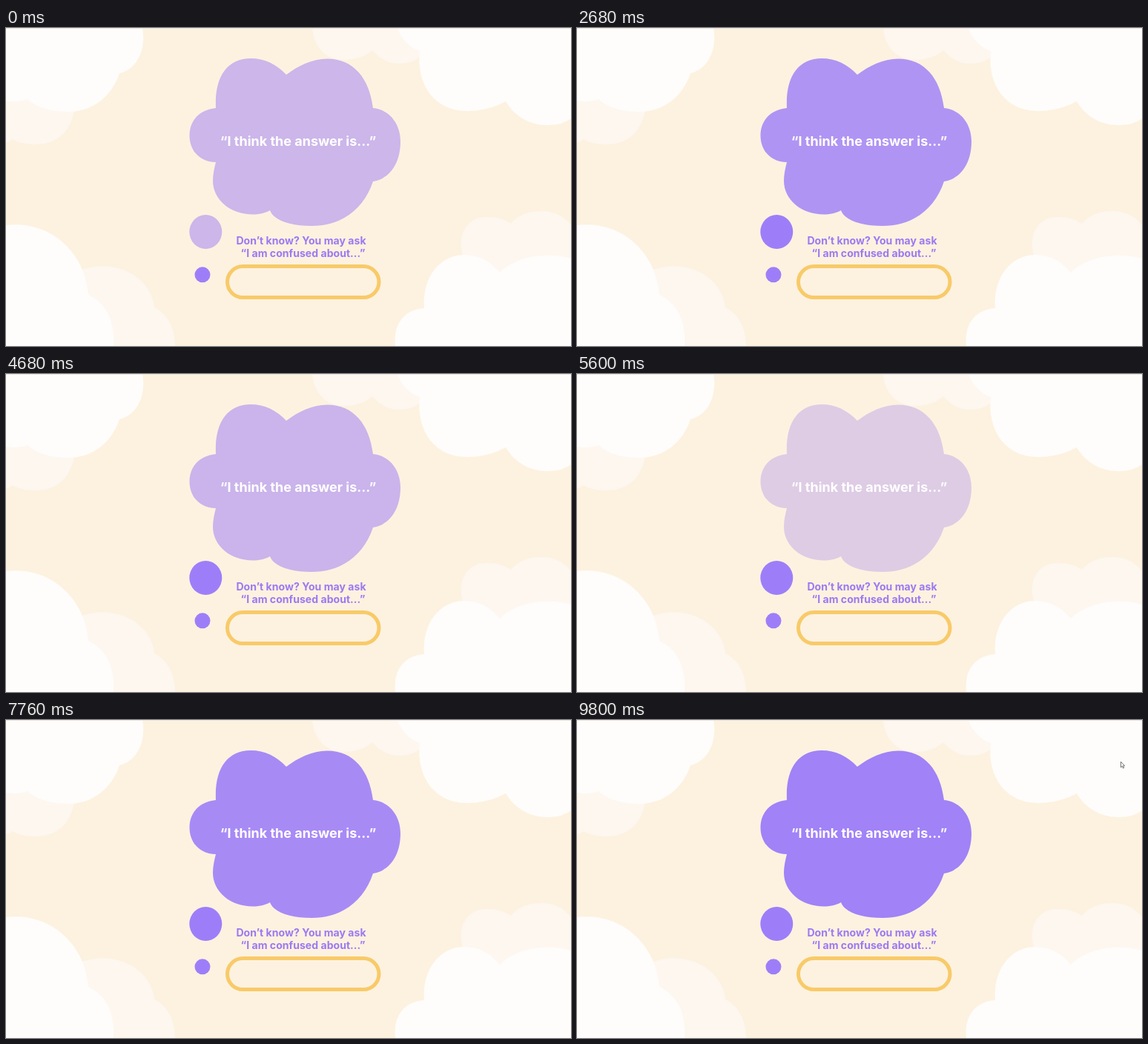
Animation of 762 by 429 pixels, one loop 9.84 s. Source, as an HTML page:

```html
<!DOCTYPE html>
<html lang="en">
<head>
<meta charset="utf-8">
<title>Thought bubble</title>
<style>
  html, body { margin: 0; width: 100%; height: 100%; overflow: hidden; background: #fdf2e0; }
  svg { display: block; width: 762px; height: 429px; }
  text { font-family: Rubik, Inter, "Open Sans", sans-serif; font-weight: 700; text-anchor: middle; }
  .white { fill: #fefdfb; }
  .faint { fill: #fdf7f0; }
  .hint { fill: #9c79f2; font-size: 14.1px; }
</style>
</head>
<body>
<svg viewBox="0 0 762 429">
  <rect width="762" height="429" fill="#fdf2e0"/>

  <g class="faint">
    <path d="M0 90H93C95 135 72 157 40 157C28 157 17 155 9 150Q5 153 0 154Z"/>
    <path d="M413 0C415 26 432 43 456 43C472 43 485 38 494 30C505 43 518 48 531 48C542 48 551 45 558 39V0Z"/>
    <path d="M100 327C150 309 197 338 200 377C217 385 228 404 228 429H100Z"/>
    <path d="M622 320C604 288 617 255 648 255C661 255 672 258 681 264C690 253 705 247 722 247C738 247 752 253 762 266V330H622Z"/>
  </g>
  <g class="white">
    <path d="M0 0H184C189 28 178 55 153 61C143 92 117 113 84 113C62 113 43 108 29 96C20 99 10 100 0 98Z"/>
    <path d="M528 0C533 15 544 26 558 31C553 78 579 112 622 112C641 112 659 107 674 99C686 119 706 131 730 131C742 131 752 129 762 122V0Z"/>
    <path d="M0 266C60 259 107 303 111 360C134 371 147 393 145 429H0Z"/>
    <path d="M525 429C522 398 538 380 564 378C561 336 585 306 619 306C637 306 654 315 666 330C687 309 727 301 762 311V429Z"/>
  </g>
  <rect width="762" height="1" fill="#ebe6de"/>

  <path id="cloud" d="M283 108C281 65 299 41 330 41C349 41 365 49 378 63C394 51 413 41.5 433 41.5C469 41.5 490 68 495 108C517 110 532 129 532 153C532 181 519 203 495 207C482 246 451 267 412 267C385 267 361 260 356 246C349 250 341 251.5 333 251.5C303 251.5 279 232 279 206C279 197 281 189 283 181C261 181 247.5 165 247.5 145C247.5 125 261 110 283 108Z"/>
  <ellipse id="big" cx="269.3" cy="275" rx="22" ry="23"/>
  <circle cx="265" cy="332.8" r="10.5" fill="#9e7ef8"/>

  <text x="394" y="158.5" font-size="18" fill="#fff">“I think the answer is...”</text>
  <text class="hint" x="398" y="292">Don’t know? You may ask</text>
  <text class="hint" x="400.5" y="308.5">“I am confused about...”</text>
  <rect x="298.5" y="321.6" width="204.5" height="42" rx="21" fill="none" stroke="#f8ca68" stroke-width="5"/>

  <path id="cursor" d="M0 0V7.6L1.8 6L3 8.8L4.2 8.2L3 5.5H5.2Z" fill="#fff" stroke="#555" stroke-width=".8"/>
</svg>
<script>
  const LOOP = 9840, STEP = 40;
  // three equal beats: big dot lights, cloud lights, both go dim
  const CYCLE = 1014, BEAT = CYCLE / 3, FADE = 100, FIRST_BEAT = 249;
  // the opening pose stands still, caught near the end of the dimming
  const OPENING = 520, OPENING_POSE = -24;
  const DIM = [222, 204, 229], LIT = [158, 126, 248];
  // time, x, y
  const CURSOR_PATH = [[9240, 763, 66], [9480, 738, 58], [9640, 733.5, 56.3]];

  const [cloud, big, cursor] = ["cloud", "big", "cursor"].map(id => document.getElementById(id));
  const clamp = v => Math.min(1, Math.max(0, v));
  const mix = (a, b, k) => a + (b - a) * k;
  const ease = k => k * k * (3 - 2 * k);
  const fade = (p, from) => ease(clamp((p - from) / FADE));
  const tint = k => `rgb(${DIM.map((c, i) => Math.round(mix(c, LIT[i], k)))})`;

  function levels(t) {
    const time = t < OPENING ? OPENING_POSE : t;
    const p = (time - FIRST_BEAT + CYCLE) % CYCLE;
    const off = fade(p, 2 * BEAT);
    return [fade(p, 0) - off, fade(p, BEAT) - off];
  }

  function cursorAt(t) {
    let [, x, y] = CURSOR_PATH[0];
    for (let i = 1; i < CURSOR_PATH.length; i++) {
      const [t0] = CURSOR_PATH[i - 1], [t1, x1, y1] = CURSOR_PATH[i];
      const k = clamp((t - t0) / (t1 - t0));
      x = mix(x, x1, k);
      y = mix(y, y1, k);
    }
    return [x, y];
  }

  function draw(now) {
    const t = Math.floor((now % LOOP) / STEP) * STEP;
    const [b, c] = levels(t);
    big.setAttribute("fill", tint(b));
    cloud.setAttribute("fill", tint(c));
    cursor.setAttribute("transform", `translate(${cursorAt(t)})`);
    cursor.setAttribute("visibility", t > CURSOR_PATH[0][0] ? "visible" : "hidden");
  }

  const start = performance.now();
  function tick() {
    draw(performance.now() - start);
    requestAnimationFrame(tick);
  }
  tick();
</script>
</body>
</html>
```
